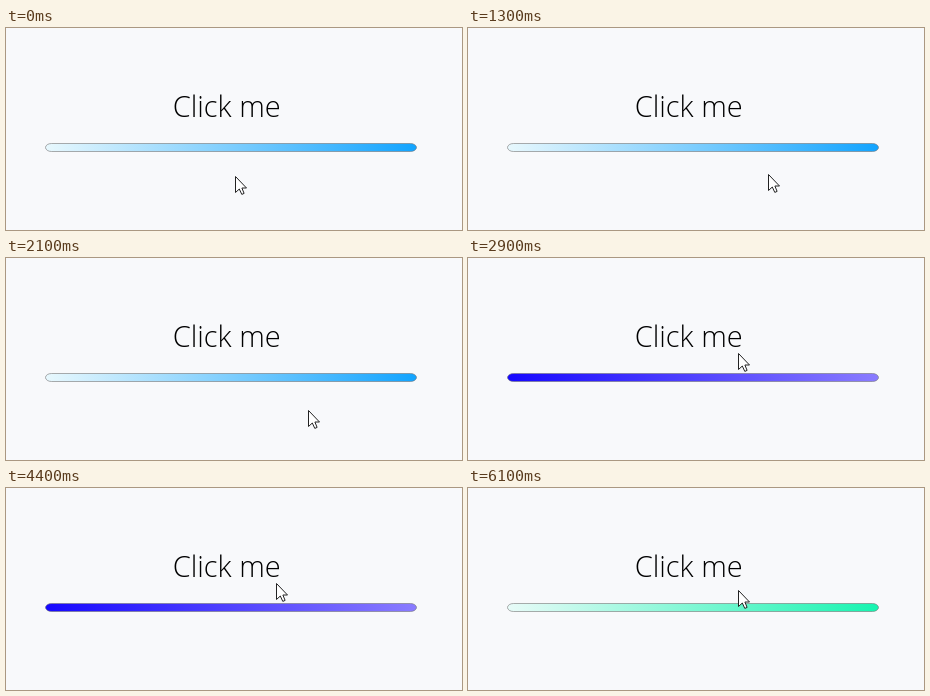
Recreate the animation shown at these times as an HTML page. Size 456 px wide and 202 px high, loop 6.2 s.

```html
<!DOCTYPE html>
<html lang="en">
<head>
<meta charset="utf-8">
<title>Click me</title>
<style>
  html, body { margin: 0; height: 100%; overflow: hidden; background: #f8f9fb; }
  svg { display: block; }
  text { font: 350 29px "Open Sans", "Noto Sans", sans-serif; }
</style>
</head>
<body>
<svg width="456" height="202" viewBox="0 0 456 202">
  <defs>
    <linearGradient id="fill">
      <stop id="left"/>
      <stop id="right" offset="1"/>
    </linearGradient>
  </defs>
  <text x="166.7" y="89">Click me</text>
  <rect x="39.5" y="115.5" width="371" height="8" rx="6" ry="4" fill="url(#fill)" stroke="#777" stroke-opacity=".6"/>
  <path id="cursor" d="M.5 .5V16.5L4.3 13 6.8 18.4 9.1 17.4 6.9 12H11.5Z" fill="#fff" stroke="#222"/>
</svg>
<script>
const LOOP = 6200, STEP = 100, HOVER_BOTTOM = 124;
const byId = id => document.getElementById(id);
const left = byId("left"), right = byId("right"), cursor = byId("cursor");

const colors = {
  idle: ["#e8f8fd", "#12a4ff"],
  hover: ["#e8fbf8", "#16f4b0"],
  active: ["#1608ff", "#8a7cff"]
};

// The pointer sweeps up and down between resting points, arriving `at` after `steps`
const rests = [
  { at: 0, steps: 1, x: 229, y: 148 },
  { at: 100, steps: 1, x: 236, y: 101 },
  { at: 600, steps: 3, x: 250, y: 172 },
  { at: 900, steps: 2, x: 276, y: 109 },
  { at: 1400, steps: 3, x: 308, y: 159 },
  { at: 1800, steps: 3, x: 300, y: 93 },
  { at: 2200, steps: 3, x: 303, y: 172 },
  { at: 2600, steps: 2, x: 270, y: 95 },
  { at: 6100, steps: 1, x: 270, y: 102 }
];

// Evenly spaced clicks
const click = { start: 2920, period: 745, hold: 440, count: 4 };

const smooth = p => p * p * (3 - 2 * p);
const mix = (a, b, p) => Math.round(a + (b - a) * p);

function pointerAt(t) {
  const i = rests.findLastIndex(r => r.at <= t);
  const from = rests[i], to = rests[i + 1] || from;
  const progress = 1 - (to.at - t) / (to.steps * STEP);
  const p = smooth(Math.max(0, Math.min(1, progress)));
  return { x: mix(from.x, to.x, p), y: mix(from.y, to.y, p) };
}

function isPressed(t) {
  const since = t - click.start;
  return since >= 0 && since < click.count * click.period && since % click.period < click.hold;
}

function draw(now) {
  // Motion is held for each step; a click shows in the step it falls in
  const t = Math.floor(now % LOOP / STEP) * STEP;
  const { x, y } = pointerAt(t);
  const state = isPressed(t + STEP - 1) ? "active" : y < HOVER_BOTTOM ? "hover" : "idle";
  left.setAttribute("stop-color", colors[state][0]);
  right.setAttribute("stop-color", colors[state][1]);
  cursor.setAttribute("transform", `translate(${x} ${y})`);
}

const start = performance.now();
function tick() {
  draw(performance.now() - start);
  requestAnimationFrame(tick);
}
tick();
</script>
</body>
</html>
```
